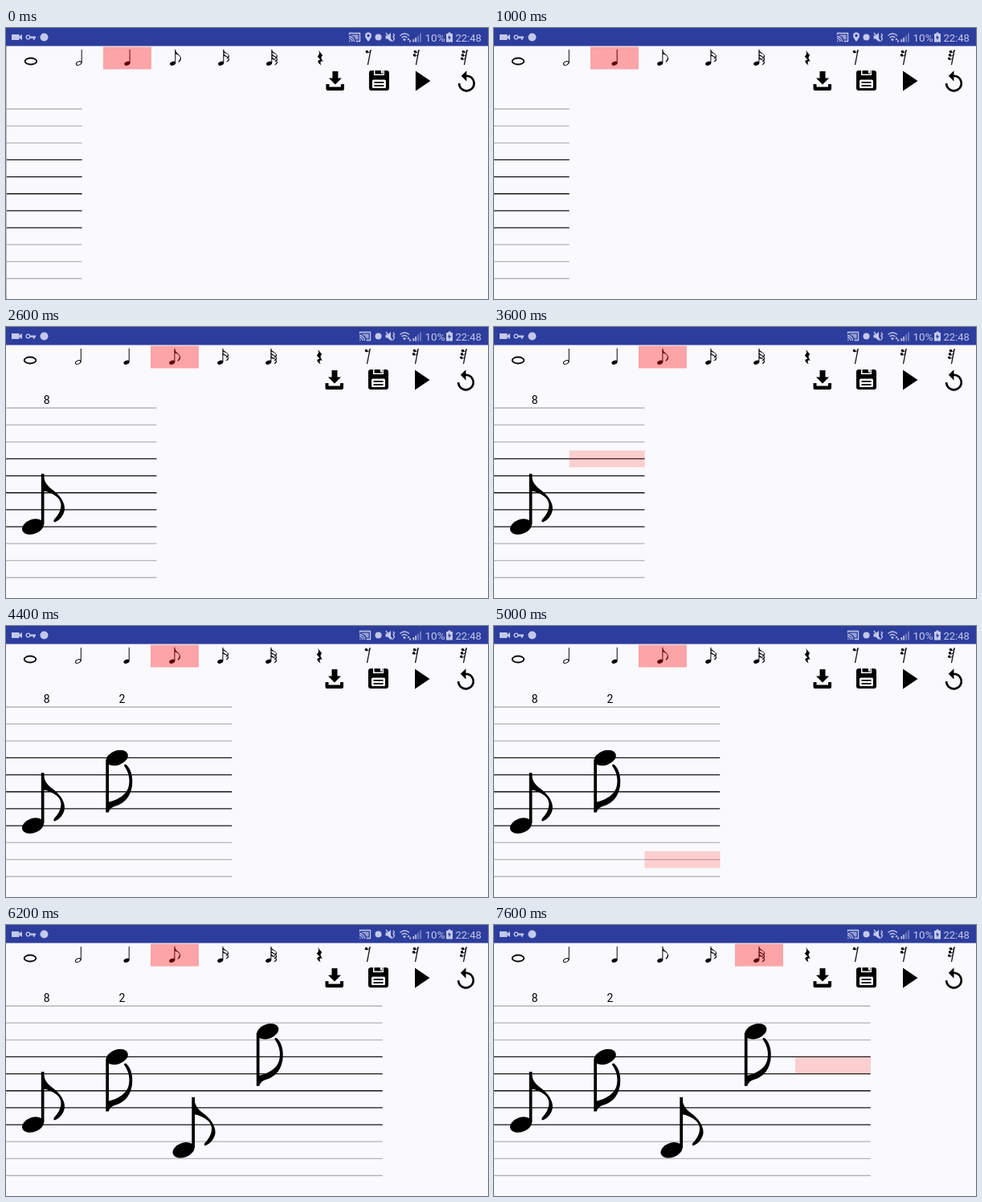
An HTML page for the animation above (8000 ms loop, 600 px wide and 338 px high).

```html
<!DOCTYPE html>
<html lang="en">
<head>
<meta charset="utf-8">
<title>Note editor</title>
<style>
html, body { margin: 0; width: 100%; height: 100%; overflow: hidden; background: #faf9fd; }
svg { display: block; width: 600px; height: 338px; }
text { font-family: Roboto, sans-serif; }
#bar { fill: #c3c9ea; stroke: none; }
#bar .line { fill: none; stroke: #c3c9ea; stroke-width: 1.3; }
.thin { fill: none; stroke: #0a0a0a; }
</style>
</head>
<body>
<svg viewBox="0 0 600 338">
  <defs>
    <!-- Notes are drawn around the centre of the head -->
    <ellipse id="head" rx="14" ry="9" transform="rotate(-20)"/>
    <path id="stem" d="M10.3 -66h3.7V-3h-3.7z"/>
    <path id="flag" d="M13 -66C14 -54 19 -50 27 -44C38 -35 42 -24 38 -16Q34 -8 27 -5.5Q25 -6 26.500 -9C36 -19 38 -30 30 -37Q22 -43.500 13 -44.500z"/>
    <g id="up"><use href="#head"/><use href="#stem"/><use href="#flag"/></g>
    <g id="down">
      <use href="#head"/>
      <path d="M-14 2h3.700V57Q-8 57 -2 54C20 45 26 24 12 8.500Q9 7.500 9.500 10C18 21 17 38 6 47Q-2 53 -10 55V68h-4z" visibility="hidden"/>
      <path d="M-14 2h3.700V55C2 52 11 46 14 37C17 27 14 17 8.500 9.500Q10 7 12 9C18 15 20 25 18.500 36C16 50 8 57 -2 60Q-9 62 -10.500 68H-14z"/>
    </g>
    <g id="hook">
      <circle cx="-1.600" cy="2" r="1.700"/>
      <path class="thin" d="M-1.500 3.400Q2 3.500 3.200 .5"/>
    </g>
  </defs>
  <rect width="600" height="338" fill="#faf9fd"/>
  <g id="page">
    <path id="edge" d="M-.4 23V338" stroke="#bbb"/>
    <g id="staff" stroke-width="1.300"></g>
    <g id="score"></g>
    <rect id="cell" width="94" height="21" fill="rgba(255,40,20,.2)"/>
    <g id="tools"></g>
    <g id="buttons">
      <path d="M405.500 54h7v8.500h4.500l-8 8-8-8h4.500zM397.500 70h4v3.500h14.500v-3.500h4v6q0 2-2 2h-18.500q-2 0-2-2z"/>
      <rect x="451" y="53" width="25" height="25" rx="3"/>
      <path d="M457 53h13v6h-13z" fill="#faf9fd"/>
      <path d="M458.500 53h10v4.500h-10z"/>
      <path d="M466 53h2v3.500h-2z" fill="#faf9fd"/>
      <rect x="455" y="64.500" width="17" height="10.500" rx="1.500" fill="#faf9fd"/>
      <path d="M457.500 67h12v1.700h-12zM457.500 71h12v1.700h-12z"/>
      <path d="M509 53.500V78.500L527.500 66z"/>
      <path transform="translate(556.500 51.800) scale(1.330)" d="M12 5V1L7 6l5 5V7c3.310 0 6 2.690 6 6s-2.690 6-6 6-6-2.690-6-6H4c0 4.420 3.580 8 8 8s8-3.580 8-8-3.580-8-8-8z"/>
    </g>
    <rect id="choice" y="23.500" width="60" height="28" fill="rgba(255,0,0,.34)"/>
  </g>
  <rect width="600" height="22.500" fill="#2d3d9d"/>
  <g id="bar">
    <path d="M7 8h9.500v2.500l3.500-2.500v7l-3.500-2.500V15H7z"/>
    <circle class="line" cx="27.500" cy="11.500" r="2.300"/>
    <path d="M30 10.500h7v2.200h-1.200v2h-2v-2H30z"/>
    <circle cx="47.500" cy="11.500" r="5"/>
    <g id="cast">
      <path class="line" d="M427.500 8.500V6.500H440.500V16.500H435.500M427 10.500a6.500 6.500 0 0 1 6.500 6.500M427 13a4 4 0 0 1 4 4"/>
      <path d="M427 15.200a2 2 0 0 1 2 2h-2zM430 8.500h8.500v6h-3q-1-4-5.500-5z" opacity=".7"/>
    </g>
    <path id="place" fill-rule="evenodd" d="M451 17C448.500 13.500 447 11.500 447 9.500a4 4 0 0 1 8 0C455 11.500 453.500 13.500 451 17zM451 7.800a1.700 1.700 0 1 0 .01 0z"/>
    <circle cx="463.500" cy="11.500" r="4"/>
    <path d="M472.500 9.500h2.500l4-3.500v11l-4-3.500h-2.500z"/>
    <path class="line" d="M473 6l8 11M482 7l1.500 2-1.500 2 1.500 2-1.500 3"/>
    <path class="line" d="M490.500 9.500q5.500-5 11.500 0M492.500 12q3.500-3 7 0"/>
    <path d="M494 14q2-1.500 4 0l-2 2.500zM499.500 15l1.500-3 1.500 3zM501.500 15.500h3l-1.500 3z"/>
    <path d="M506.500 14h1.700v3.500h-1.700zM509.300 12h1.700v5.500h-1.700z"/>
    <path d="M512.200 9.500h1.700v8h-1.700zM515.200 6.500h1.700v11h-1.700z" opacity=".5"/>
    <path fill-rule="evenodd" d="M550.500 5.500h3V7h2.500v10.500h-8V7h2.500zM552 8.500l-2 4h1.500v3l2.500-4.500h-2z"/>
    <text x="521.500" y="16.500" font-size="13.500">10%</text>
    <text x="559.500" y="16.500" font-size="13">22:48</text>
  </g>
</svg>
<script>
const LOOP = 8000, COLUMN = 93.75, GAP = 21.15, TOP = 101;
const byId = id => document.getElementById(id);
const lineY = row => TOP + row * GAP;
const stepAt = (t, steps) => steps.filter(([start]) => t >= start).pop()[1];
const show = (node, on) => node.setAttribute('visibility', on ? 'visible' : 'hidden');

const notes = [
  { at: 2600, shape: 'up', x: 33.5, row: 7, label: 8 },
  { at: 4400, shape: 'down', x: 138.3, row: 3, label: 2 },
  { at: 5600, shape: 'up', x: 221, row: 8.5 },
  { at: 6200, shape: 'down', x: 325.8, row: 1.5 }
];
// start, end, column, row
const touches = [
  [2400, 2600, 0, 7], [3200, 4400, 1, 3], [5000, 5200, 2, 9],
  [5200, 5600, 2, 8.5], [7600, LOOP, 4, 3.5]
];

const staff = byId('staff'), score = byId('score'), cell = byId('cell');

for (let row = 0; row <= 10; row++) {
  const color = row > 2 && row < 8 ? '#151515' : '#b4b3b6';
  staff.innerHTML += `<line y1="${lineY(row)}" y2="${lineY(row)}" stroke="${color}"/>`;
}

score.innerHTML = notes.map(({ shape, x, row, label }, i) => `<g>
  <use href="#${shape}" x="${x}" y="${lineY(row)}"/>
  ${label ? `<text x="${50.7 + i * COLUMN}" y="96" font-size="14" text-anchor="middle">${label}</text>` : ''}
</g>`).join('');

function smallNote(x, flags) {
  let parts = '<use href="#head"/><use href="#stem"/>';
  if (flags === 1) parts += '<use href="#flag"/>';
  else for (let i = 0; i < flags; i++)
    parts += `<use href="#flag" transform="translate(0 ${i * 15 - 18}) scale(1 .72)"/>`;
  return `<g transform="translate(${x} 44.2) scale(.263)">${parts}</g>`;
}

function shortRest(x, hooks) {
  let parts = '<path class="thin" stroke-width="1.3" d="M3.2 -.5L-.5 18.5"/>';
  for (let i = 0; i < hooks; i++)
    parts += `<use href="#hook" x="${-i * .9}" y="${i * 4.3}"/>`;
  return `<g transform="translate(${x} 27.5)">${parts}</g>`;
}

byId('tools').innerHTML = `
  <ellipse class="thin" cx="30" cy="41.5" rx="7.3" ry="4" stroke-width="1.8"/>
  <ellipse class="thin" cx="89.7" cy="44" rx="3.4" ry="2.1" transform="rotate(-25 89.7 44)"/>
  <path class="thin" d="M93.3 27V43.500"/>
  ${smallNote(150, 0)}${[1, 2, 3].map(n => smallNote(146.7 + n * 60, n)).join('')}
  <path d="M387.800 27.500L393.200 34C390.500 37 391.500 38.500 394 41.800C390.500 40.500 389.500 42.500 391.800 46.500C386 43.500 386.500 39.500 390.500 39.800L386.800 35.500C389.800 32.800 389.500 30.500 387.800 27.500z"/>
  ${[1, 2, 3].map(n => shortRest(390 + n * 60, n)).join('')}`;

function draw() {
  const t = performance.now() % LOOP;
  const early = t < 600;
  byId('page').setAttribute('transform', `translate(${early ? .9 : 0} 0)`);
  show(byId('edge'), early);
  byId('choice').setAttribute('x', stepAt(t, [[0, 120], [1800, 180], [7000, 300]]));

  const columns = 1 + notes.filter(n => t >= n.at).length;
  for (const line of staff.children) line.setAttribute('x2', columns * COLUMN);
  notes.forEach((n, i) => show(score.children[i], t >= n.at));

  const touch = touches.find(([from, to]) => t >= from && t < to);
  show(cell, touch);
  if (touch) {
    cell.setAttribute('x', touch[2] * COLUMN);
    cell.setAttribute('y', lineY(touch[3]) - 10.5);
  }

  const located = t < 2400;
  show(byId('place'), located);
  byId('cast').setAttribute('transform', `translate(${located ? 0 : 13} 0)`);
  requestAnimationFrame(draw);
}
draw();
</script>
</body>
</html>
```
